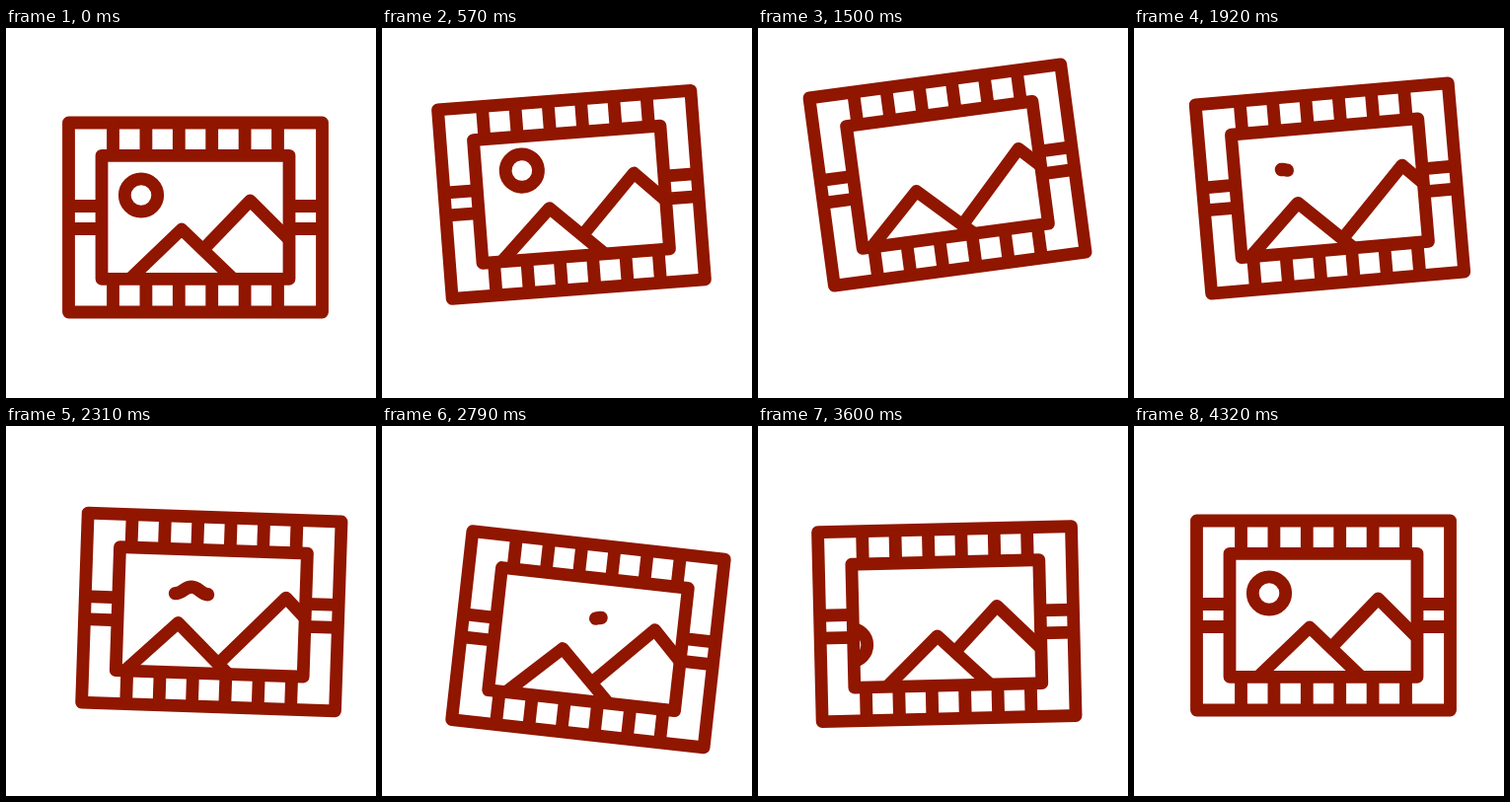
Write an HTML page with a canvas that moves like this. It is 375x375 px and loops after 5400 ms.

```html
<!DOCTYPE html>
<html lang="en">
<head>
<meta charset="utf-8">
<title>Picture frame</title>
<style>
  html, body { margin: 0; width: 100%; height: 100%; overflow: hidden; background: #fff; }
  canvas { display: block; width: 100vmin; height: 100vmin; }
</style>
</head>
<body>
<canvas id="stage" width="375" height="375"></canvas>
<script>
const ctx = document.getElementById('stage').getContext('2d');
const LOOP = 5400, STEP = 30, START = 180, END = 4320;
const INK = '#901600', LINE = 12.8;
const HOME = { x: -55, y: -22.5 }; // the sun at rest

const easeOut = u => u * (2 - u);
const swing = u => (1 - Math.cos(Math.PI * u)) / 2;
const clamp = u => Math.max(0, Math.min(1, u));

// Passes through [time, value] stops: a quick lift-off, then soft swings.
function track(...stops) {
  return t => stops.slice(1).reduce((value, [time, next], i) => {
    const u = clamp((t - stops[i][0]) / (time - stops[i][0]));
    return value + (next - stops[i][1]) * (i ? swing(u) : easeOut(u));
  }, stops[0][1]);
}

const lift = track([START, 192], [1400, 149], [1470, 149], [3050, 221], [3920, 192]);
const sway = track([START, 192], [1470, 192], [2640, 212], [3300, 187.3], [3700, 192]);
const tilt = track([START, 0], [1300, -7.6], [1580, -7.6], [2760, 6.4], [3300, -3.2], [3850, 0]);
const spread = track([START, 0], [1600, 19.5], [2400, 19.5], [3350, -5], [END, 0]);

function line(...points) {
  ctx.beginPath();
  points.forEach(([x, y]) => ctx.lineTo(x, y));
  ctx.stroke();
}

function drawFrame() {
  ctx.strokeRect(-128.5, -96, 257, 192);
  ctx.strokeRect(-95, -62.7, 190, 125);
  for (let i = 0; i < 6; i++) {
    const x = -83.5 + 33.4 * i;
    line([x, -96], [x, -63]);
    line([x, 62], [x, 96]);
  }
  for (const y of [-11.5, 11.5]) {
    line([-128.5, y], [-95, y]);
    line([95, y], [128.5, y]);
  }
}

function drawMountains(gap) {
  const left = -14 - gap, right = 55.5 + gap, rise = 0.96, fall = 1.04;
  // The far slope ends where it meets the near one.
  const x = (-17 + fall * right - 12 + rise * left) / (rise + fall);
  const foot = 12 + 54 * rise;
  line([left - 54, foot], [left, 12], [left + 54, foot]);
  line([x, 12 + rise * (x - left)], [right, -17], [right + 50, 33]);
}

// Leaves through the top, gaining speed, and comes back from the lower left, slowing down.
function drawSun(t) {
  const away = clamp((t - START) / 1400), back = clamp((END - t) / 1000);
  const leaving = t < LOOP / 2;
  const x = HOME.x + (leaving ? 88 * away ** 2 : -70 * back ** 1.5);
  const y = HOME.y + (leaving ? -72 * away ** 2 : 68 * back ** 1.5);
  ctx.beginPath();
  ctx.arc(x, y, 16.7, 0, 2 * Math.PI);
  ctx.stroke();
}

// Unfolds from a dot, glides to the right and folds up again.
function drawBird(t) {
  const open = clamp(Math.min((t - 1860) / 330, (2850 - t) / 360));
  if (open === 0) return;
  const w = 16.5 * open, top = -2 * open ** 2, tip = 5 * open ** 2;
  ctx.save();
  ctx.translate(-44.3 + (t - 1920) * 0.06, -22.7);
  ctx.rotate((2310 - t) * 0.0005);
  ctx.lineWidth = 13.4;
  ctx.lineCap = 'round';
  ctx.beginPath();
  ctx.moveTo(-w, tip);
  ctx.bezierCurveTo(-0.55 * w, tip, -0.45 * w, top, 0, top);
  ctx.bezierCurveTo(0.45 * w, top, 0.55 * w, tip, w, tip);
  ctx.stroke();
  ctx.restore();
}

function draw(t) {
  ctx.fillStyle = '#fff';
  ctx.fillRect(0, 0, 375, 375);
  ctx.save();
  ctx.translate(sway(t), lift(t));
  ctx.rotate(tilt(t) * Math.PI / 180);
  ctx.strokeStyle = INK;
  ctx.lineWidth = LINE;
  ctx.lineJoin = 'round';

  ctx.save();
  ctx.beginPath();
  ctx.rect(-95, -63, 190, 125);
  ctx.clip();
  drawSun(t);
  drawBird(t);
  drawMountains(spread(t));
  ctx.restore();

  drawFrame();
  ctx.restore();
}

function tick() {
  const t = performance.now() % LOOP;
  draw(Math.floor(t / STEP) * STEP);
  requestAnimationFrame(tick);
}
tick();
</script>
</body>
</html>
```
